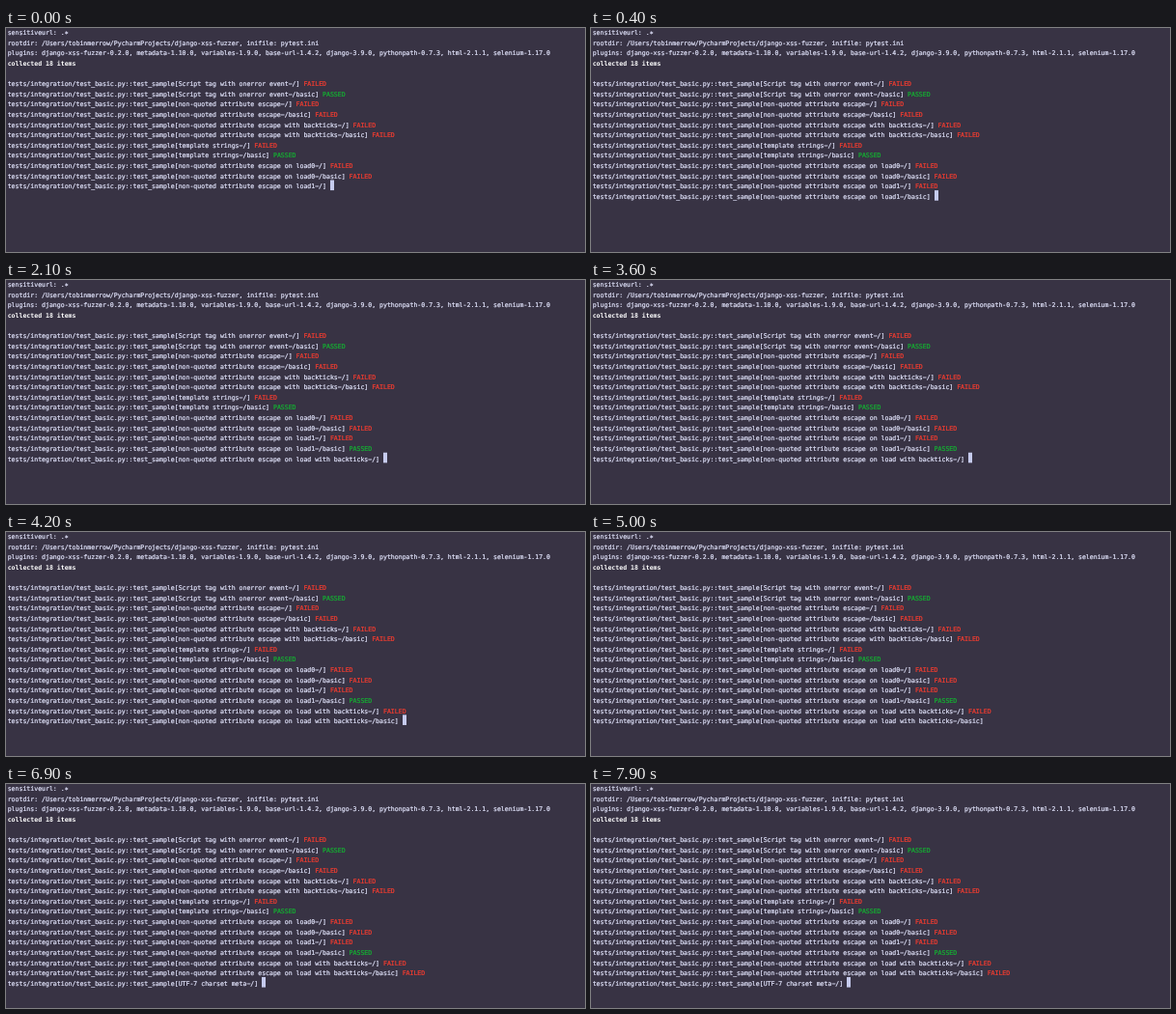
These frames come from a looping animation (600 px wide and 232 px high, 8000 ms). An HTML page:

```html
<!DOCTYPE html>
<html lang="en">
<head>
<meta charset="utf-8">
<title>Test run</title>
<style>
html, body { margin: 0; width: 100%; height: 100%; overflow: hidden; background: #383344; }
svg { display: block; width: 600px; height: 232px; }
text {
  font: 6.54px "DejaVu Sans Mono", monospace;
  color: #e0e2fa;
  white-space: pre;
  text-rendering: geometricPrecision;
}
text, tspan { fill: currentColor; stroke: currentColor; stroke-width: 0.22px; }
.bold { font-weight: bold; color: #fff; stroke-width: 0; }
.FAILED { color: #f23c30; }
.PASSED { color: #14b032; }
</style>
</head>
<body>
<svg viewBox="0 0 600 232">
  <rect width="600" height="232" fill="#383344"/>
  <g id="screen"></g>
  <rect id="cursor" width="4" height="10.6" fill="#c6cbee"/>
</svg>
<script>
const LOOP = 8000;
const LEFT = 1.7, CHAR = 3.937, LINE = 10.62;
const FIRST_TEST = 5;
const PREFIX = 'tests/integration/test_basic.py::test_sample';
const NS = 'http://www.w3.org/2000/svg';

// The terminal font draws ".*" with a centred star and "-/" with a long dash.
const header = [
  'sensitiveurl: .\u2217',
  'rootdir: /Users/tobinmerrow/PycharmProjects/django-xss-fuzzer, inifile: pytest.ini',
  'plugins: django-xss-fuzzer-0.2.0, metadata-1.10.0, variables-1.9.0, base-url-1.4.2, ' +
    'django-3.9.0, pythonpath-0.7.3, html-2.1.1, selenium-1.17.0',
  'collected 18 items'
];

// Each case runs twice: "/" and "/basic"; P = passed, F = failed.
const cases = [
  ['Script tag with onerror event', 'FP'],
  ['non-quoted attribute escape', 'FF'],
  ['non-quoted attribute escape with backticks', 'FF'],
  ['template strings', 'FP'],
  ['non-quoted attribute escape on load0', 'FF'],
  ['non-quoted attribute escape on load1', 'FP'],
  ['non-quoted attribute escape on load with backticks', 'FF'],
  ['UTF-7 charset meta', ' ']
];

// Live tests: start, result time, then the moments the cursor toggles.
const live = {
  10: { start: 0, end: 300, blinks: [] },
  11: { start: 400, end: 1900, blinks: [1400] },
  12: { start: 2000, end: 3800, blinks: [3000, 3600] },
  13: { start: 3900, end: 6200, blinks: [4800, 5300, 5900] },
  14: { start: 6300, end: LOOP, blinks: [7300, 7900] }
};

const screen = document.getElementById('screen');
const cursor = document.getElementById('cursor');

function add(parent, tag, content, cls) {
  const node = document.createElementNS(NS, tag);
  node.textContent = content;
  if (cls) node.setAttribute('class', cls);
  return parent.appendChild(node);
}

function addLine(row, content, cls) {
  const line = add(screen, 'text', content, cls);
  line.setAttribute('x', LEFT);
  line.setAttribute('y', 7 + row * LINE);
  return line;
}

header.forEach((s, i) => addLine(i, s, i === 3 ? 'bold' : ''));

const tests = [];
for (const [name, results] of cases) {
  [...results].forEach((r, i) => {
    const row = FIRST_TEST + tests.length;
    const label = `${PREFIX}[${name}\u2212/${i ? 'basic' : ''}] `;
    const line = addLine(row, label);
    const word = r === 'P' ? 'PASSED' : r === 'F' ? 'FAILED' : '';
    const result = add(line, 'tspan', word, word);
    tests.push({ row, label, line, result, ...live[tests.length] });
  });
}
const running = tests.filter(t => t.blinks);

function show(node, on) {
  node.style.display = on ? '' : 'none';
}

function render(t) {
  let lit = false;
  for (const test of running) {
    show(test.line, t >= test.start);
    show(test.result, t >= test.end);
    if (t < test.start || t >= test.end) continue;
    lit = test.blinks.filter(b => t >= b).length % 2 === 0;
    cursor.setAttribute('x', Math.floor(LEFT + test.label.length * CHAR));
    cursor.setAttribute('y', test.row * LINE - 1.8);
  }
  show(cursor, lit);
}

const began = performance.now();
function tick() {
  render((performance.now() - began) % LOOP);
  requestAnimationFrame(tick);
}
tick();
</script>
</body>
</html>
```
